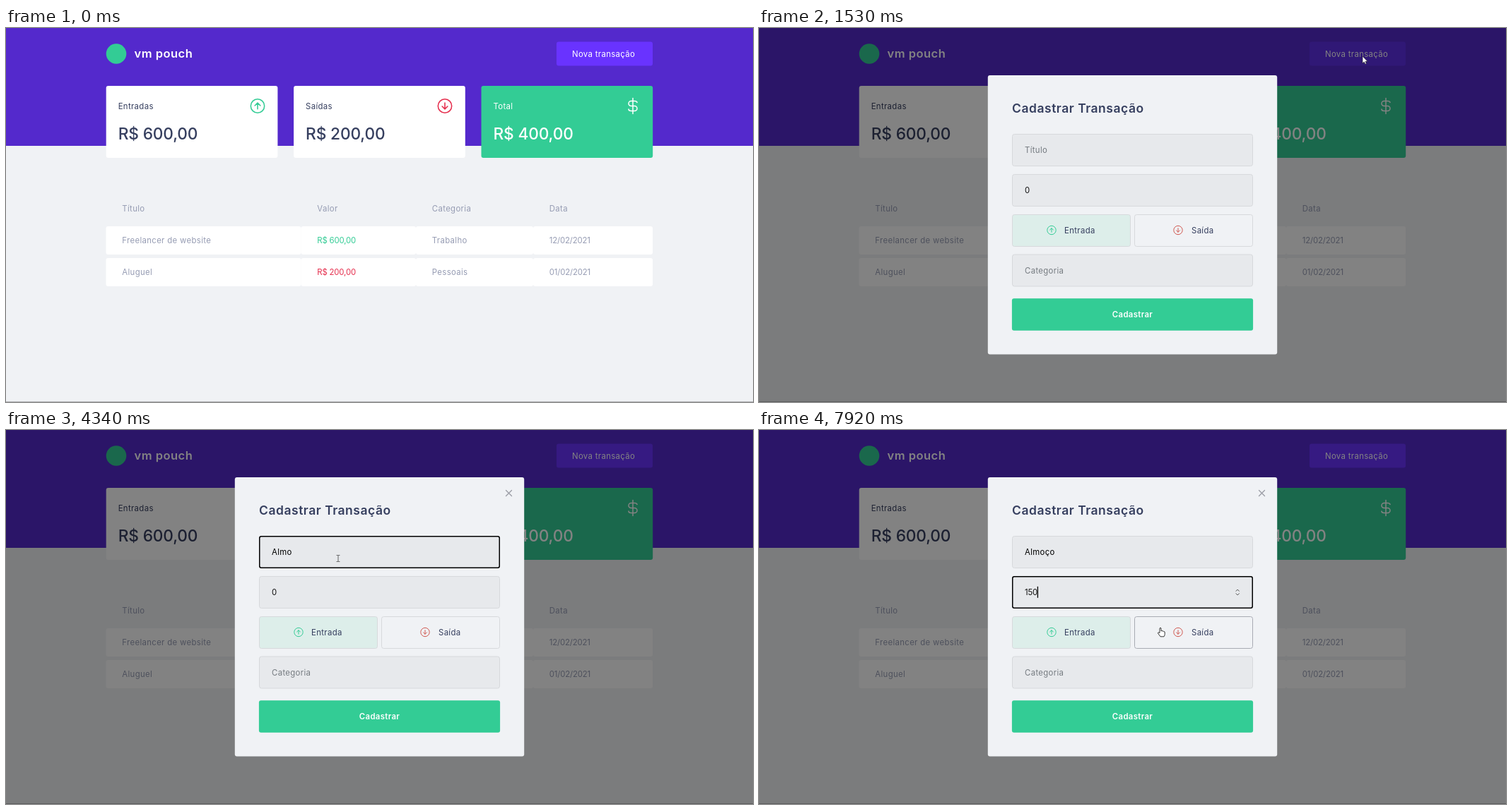
An HTML page for the animation above (8 s loop, 1057 by 530 pixels).

```html
<!DOCTYPE html>
<html lang="pt-BR">
<head>
<meta charset="utf-8">
<style>
  html, body { margin: 0; width: 100%; height: 100%; overflow: hidden; background: #f0f2f5; }
  svg { display: block; }
  text { font: 400 11.38px Inter, sans-serif; letter-spacing: .03em; white-space: pre; }
  .num { letter-spacing: -.015em; }
  .sum { font-size: 22.75px; font-weight: 500; letter-spacing: -.008em; }
  .bold { font-weight: 600; letter-spacing: .03em; }
  .line { fill: none; stroke-linecap: round; stroke-linejoin: round; }
</style>
</head>
<body>
<svg id="stage" width="1057" height="530" viewBox="0 0 1057 530"></svg>
<script>
const LOOP = 8000;
const GREEN = '#33cc95', RED = '#e52e4d', INK = '#363f5f', MUTED = '#969cb3';

const rect = (x, y, w, h, fill, extra = 'rx="3"') =>
  `<rect x="${x}" y="${y}" width="${w}" height="${h}" fill="${fill}" ${extra}/>`;
const text = (x, y, str, fill, extra = '') =>
  `<text x="${x}" y="${y}" fill="${fill}" ${extra}>${str}</text>`;
const line = (d, color, width, extra = '') =>
  `<path class="line" d="${d}" stroke="${color}" stroke-width="${width}" ${extra}/>`;

const arrowIcon = (x, y, scale, color, turn) =>
  `<g transform="translate(${x} ${y}) rotate(${turn}) scale(${scale})">
    <circle r="10" fill="none" stroke="${color}" stroke-width="1.6"/>
    ${line('M0 4.5V-4.5M-4 -.5L0 -4.5L4 -.5', color, 1.6)}</g>`;

const card = (x, label, sum, fill, ink, icon) =>
  rect(x, 82, 242.7, 102, fill) + text(x + 17, 114.5, label, ink) +
  text(x + 17, 158, sum, ink, 'class="sum"') + icon;

const columns = [141.5, 417.5, 580, 746, 915];
const row = (y, cells, valueColor) => cells.map((cell, i) =>
  rect(columns[i], y, columns[i + 1] - columns[i], 40, '#fff') +
  text(columns[i] + 22.8, y + 24, cell, i === 1 ? valueColor : MUTED, i % 2 ? 'class="num"' : '')).join('');

const field = (y, x = 358.5, w = 340, fill = '#e7e9ec', extra = '') =>
  rect(x, y, w, 45, fill, `rx="3" stroke="#d7d9dc" ${extra}`);

const page =
  rect(0, 0, 1057, 167, '#5429cc', '') +
  `<circle cx="156" cy="36.5" r="14.3" fill="${GREEN}"/>` +
  text(181.5, 42, 'vm pouch', '#fff', 'class="bold" style="font-size:16.5px"') +
  rect(779, 19.5, 136, 34, '#6933ff', 'rx="3" id="newButton"') +
  text(801, 40.5, 'Nova transação', '#fff') +
  card(141.7, 'Entradas', 'R$ 600,00', '#fff', INK, arrowIcon(356, 110.5, .97, GREEN, 0)) +
  card(407.1, 'Saídas', 'R$ 200,00', '#fff', INK, arrowIcon(621, 110.5, .97, RED, 180)) +
  card(672.5, 'Total', 'R$ 400,00', GREEN, '#fff',
    line('M12 1V23M18 7Q17.5 5 14.5 5H9.5a3.5 3.5 0 0 0 0 7h5a3.5 3.5 0 0 1 0 7H9.5Q6 19 6 16.5',
      '#fff', 1.5, 'transform="translate(875 98.5)"')) +
  ['Título', 'Valor', 'Categoria', 'Data'].map((head, i) =>
    text(columns[i] + 22.8, 259.5, head, MUTED)).join('') +
  row(281, ['Freelancer de website', 'R$ 600,00', 'Trabalho', '12/02/2021'], GREEN) +
  row(326, ['Aluguel', 'R$ 200,00', 'Pessoais', '01/02/2021'], RED) +
  rect(0, 529, 1057, 1, '#b4b5b8', '');

const modal =
  rect(0, 0, 1057, 530, '#000', 'opacity=".49"') +
  rect(323.8, 67, 409.4, 395.6, '#f0f2f5') +
  line('M707.5 85.5l8 8m0-8l-8 8', '#9a9ca5', 1.3, 'id="closeIcon"') +
  text(358, 120, 'Cadastrar Transação', INK, 'class="bold" style="font-size:17.5px"') +
  field(150.5) + field(207.5) + field(321) +
  field(264.5, 358.5, 167, '#ddeeea') +
  field(264.5, 531.5, 167, '#f0f2f5', 'id="outButton"') +
  arrowIcon(414, 286.5, .62, GREEN, 0) + text(432, 290.7, 'Entrada', INK) +
  arrowIcon(593, 286.5, .62, '#d0584f', 180) + text(612, 290.7, 'Saída', INK) +
  text(376, 347.5, 'Categoria', '#757b80') +
  rect(357.9, 383.2, 341.2, 45.5, GREEN) +
  text(528.5, 410, 'Cadastrar', '#fff', 'class="bold" text-anchor="middle"') +
  rect(358.75, 0, 339.5, 44.5, 'none', 'rx="2.5" id="focusRing" stroke="#000" stroke-width="1.5"') +
  line('M675 228.3l2.2-2.3l2.2 2.3M675 231.7l2.2 2.3l2.2-2.3', '#555', 1, 'id="spinner"') +
  rect(375.5, 221.5, 7.5, 16.5, '#338fff', 'id="selection"') +
  text(376, 177, '', '#000', 'id="titleText"') +
  text(376, 234, '', '#111', 'id="valueText" class="num"') +
  rect(0, 0, 1.3, 16, '#000', 'id="caret"');

const pointers =
  `<g id="pointer">
    <path id="arrow" d="M0 0V10L2.3 7.9L3.8 11.2L5.4 10.5L4 7.3H7Z" fill="#fff" stroke="#222" stroke-width=".6"/>
    ${line('M-2 -4.5H-.6L0 -4L.6 -4.5H2M0 -4V4M-2 4.5H-.6L0 4L.6 4.5H2', '#444', .8, 'id="beam"')}
    <path id="hand" d="M-2 1.5V-5Q-1 -7 0 -5V-1.2Q1 -2.2 2 -.9Q3 -1.8 3.8 -.3Q5.2 -.8 5.2 1V3.5Q5.2 5 4 6.8H-1L-4.6 1.8Q-4.5 -.2 -2 1.5Z"
      fill="#fff" stroke="#222" stroke-width=".9" stroke-linejoin="round"/></g>`;

const stage = document.getElementById('stage');
stage.innerHTML = page + `<g id="modal">${modal}</g>` + pointers;
const el = Object.fromEntries([...stage.querySelectorAll('[id]')].map(node => [node.id, node]));

const show = (node, on) => node.setAttribute('visibility', on ? 'inherit' : 'hidden');
const set = (node, attrs) => { for (const key in attrs) node.setAttribute(key, attrs[key]); };
const within = (t, spans) => spans.some(([from, to]) => t >= from && t < to);
const latest = (t, steps) => steps.filter(([at]) => t >= at).pop()[1];

const titleSteps = [[0, 'Título'], [3430, 'A'], [3530, 'Al'], [3730, 'Alm'], [3860, 'Almo'], [4540, 'Almoç'], [4640, 'Almoço']];
const valueSteps = [[0, '0'], [6140, '1'], [6330, '15'], [6530, '150']];
const caretSpans = [[2330, 2930], [3430, 4340], [4540, 5140], [6140, 7120], [7620, LOOP]];
const route = [
  [320, 1040, 508], [620, 965, 285], [820, 900, 120], [1020, 858, 45], [1420, 854, 40], [1520, 854, 40],
  [1720, 755, 120], [1920, 613, 204], [2020, 520, 190], [2120, 470, 182],
  [7420, 470, 182], [7620, 505, 218], [7820, 560, 276], [7920, 569, 286], [LOOP, 569, 286]
];

function pointerAt(t) {
  const i = Math.max(1, route.findIndex(([at]) => at > t));
  const [t0, x0, y0] = route[i - 1], [t1, x1, y1] = route[i];
  const k = (t - t0) / (t1 - t0);
  return [x0 + (x1 - x0) * k, y0 + (y1 - y0) * k];
}

function draw(t) {
  const open = t >= 1520, onValue = t >= 5140;

  const hover = t < 1620 ? Math.min(1, Math.max(0, (t - 1040) / 200)) : 0;
  el.newButton.style.filter = `brightness(${1 - .1 * hover})`;

  show(el.modal, open);
  show(el.closeIcon, open && t >= 1620);
  show(el.focusRing, open && t >= 2330);
  set(el.focusRing, { y: onValue ? 207.75 : 150.75 });
  show(el.spinner, open && onValue);
  show(el.selection, open && onValue && t < 6140);

  el.titleText.textContent = latest(t, titleSteps);
  el.valueText.textContent = latest(t, valueSteps);
  set(el.titleText, { fill: t < 3430 ? '#757b80' : '#000' });
  set(el.valueText, { fill: onValue && t < 6140 ? '#fff' : '#111' });

  const active = onValue ? el.valueText : el.titleText;
  const typed = t < 3430 ? 0 : active.getComputedTextLength();
  set(el.caret, { x: 375.7 + typed, y: onValue ? 221.8 : 165 });
  show(el.caret, open && within(t, caretSpans));

  // The pointer is sampled ten times a second.
  const [x, y] = pointerAt(Math.floor((t - 20) / 100) * 100 + 20);
  const inForm = open && x > 358 && x < 699;
  const beam = inForm && within(y, [[150, 196], [207, 253]]);
  const hand = inForm && within(y, [[264, 310]]);
  const visible = t >= 320;
  set(el.pointer, { transform: `translate(${x} ${y})` });
  show(el.beam, visible && beam);
  show(el.hand, visible && hand);
  show(el.arrow, visible && !beam && !hand);
  set(el.outButton, { stroke: hand ? '#a8abb3' : '#d7d9dc' });
}

const start = performance.now();
(function tick() {
  draw((performance.now() - start) % LOOP);
  requestAnimationFrame(tick);
})();
</script>
</body>
</html>
```
